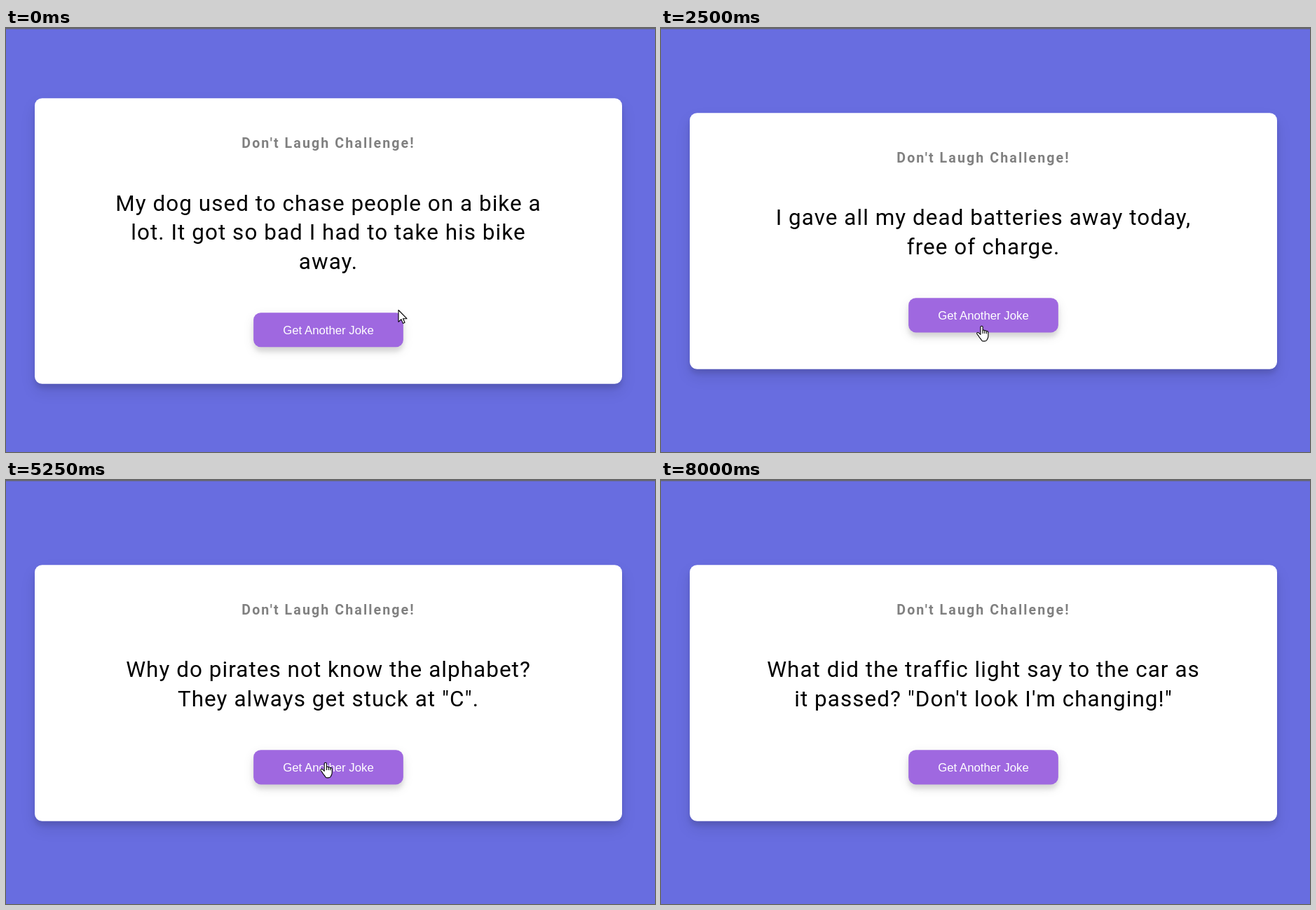
These frames come from a looping animation (926 px wide and 605 px high, 8500 ms). An HTML page:

```html
<!DOCTYPE html>
<html lang="en">
<head>
<meta charset="utf-8">
<title>Don't Laugh Challenge</title>
<style>
  html, body { margin: 0; width: 100%; height: 100%; overflow: hidden; }
  body { position: relative; background: #686de0; font-family: Roboto, sans-serif; }
  .edge {
    position: absolute; left: 0; top: 0; width: 100%; height: 2px;
    background: linear-gradient(#66666c 50%, #6667a0 50%);
  }
  .card {
    position: absolute; left: 60px; top: 303.8px; width: 800px;
    box-sizing: border-box; padding: 50px 20px;
    transform: translateY(-50%) scale(1.0475);
    background: #fff; border-radius: 10px; text-align: center;
    box-shadow: 0 10px 20px rgba(0, 0, 0, .1), 0 6px 6px rgba(0, 0, 0, .1);
  }
  h3, .joke { position: relative; top: 1.3px; }
  h3 { margin: 0; font-size: 18.72px; line-height: 22px; letter-spacing: 2px; color: #808080; }
  .joke {
    margin: 50px 0; font-size: 30px; line-height: 40px;
    letter-spacing: 1px; white-space: pre; color: #000;
  }
  .btn {
    display: block; width: 204px; height: 47px; margin: 0 auto; padding: 0;
    border: 0; border-radius: 10px; background: #9f68e0; color: #fff;
    font: 16px/47px "Liberation Sans", Arial, sans-serif;
    box-shadow: 0 5px 15px rgba(0, 0, 0, .1), 0 6px 6px rgba(0, 0, 0, .1);
  }
  .btn.down { transform: scale(.98); }
  svg {
    position: absolute; left: 0; top: 0; width: 20px; height: 26px; overflow: visible;
    fill: #fff; stroke: #000; stroke-width: 1.1; stroke-linejoin: round;
  }
</style>
</head>
<body>
<div class="edge"></div>
<main class="card">
  <h3>Don't Laugh Challenge!</h3>
  <div class="joke"></div>
  <button class="btn">Get Another Joke</button>
</main>
<svg id="arrow"><path d="M.5 .5V17.3L4.4 13.6 6.9 19.4 9.5 18.3 7 12.7H12.4Z"/></svg>
<svg id="hand">
  <path d="M6.2 2.3C6.2 .2 9.4 .2 9.4 2.3V7.4C9.6 6 12.2 6.2 12.2 7.9 12.6 6.8 14.8 7.1 14.8 8.7 15.2 7.8 17.2 8.1 17.2 9.8V15C17.2 18 15.8 19 15.3 20.6 14.6 22.8 8.8 23 7.8 21.2 6.4 18.8 4.8 17.6 3.6 15.2 2.8 13.6 .9 12.6 .9 11.3 .9 9.8 3 9.6 4.2 10.8L6.2 12.8Z"/>
  <path fill="none" d="M9.4 7.4V11.4M12.2 7.9V11.6M14.8 8.7V11.8"/>
</svg>
<script>
  const LOOP = 8500;

  const jokes = [
    [0, "My dog used to chase people on a bike a\nlot. It got so bad I had to take his bike\naway."],
    [2500, "I gave all my dead batteries away today,\nfree of charge."],
    [4000, "Why can’t you hear a pterodactyl go to the\nbathroom? The p is silent."],
    [5250, "Why do pirates not know the alphabet?\nThey always get stuck at \"C\"."],
    [6250, "The best time on a clock is 6:30--hands\ndown."],
    [7500, "What did the traffic light say to the car as\nit passed? \"Don't look I'm changing!\""]
  ];

  // time, cursor shape, left, top
  const moves = [
    [0, "arrow", 559.5, 402],
    [250, "hand", 530, 412],
    [500, "hand", 472, 418],
    [750, "hand", 460, 422.5],
    [1000, "hand", 449.7, 424.5],
    [3000, "hand", 448.5, 414],
    [3250, "hand", 448, 402.5],
    [7750, "arrow", 902, 312],
    [8000, "none", 0, 0]
  ];

  const presses = [2000, 3750, 6000, 7000];
  const HOLD = 250;

  const joke = document.querySelector(".joke");
  const btn = document.querySelector(".btn");
  const cursors = ["arrow", "hand"].map(id => document.getElementById(id));

  const stepAt = (steps, t) => steps.filter(s => s[0] <= t).pop();

  function draw() {
    const t = performance.now() % LOOP;
    const text = stepAt(jokes, t)[1];
    if (joke.textContent !== text) joke.textContent = text;

    btn.classList.toggle("down", presses.some(p => t >= p && t < p + HOLD));

    const [, shape, x, y] = stepAt(moves, t);
    for (const c of cursors) {
      c.style.display = c.id === shape ? "block" : "none";
      c.style.transform = `translate(${x}px, ${y}px)`;
    }
    requestAnimationFrame(draw);
  }
  draw();
</script>
</body>
</html>
```
